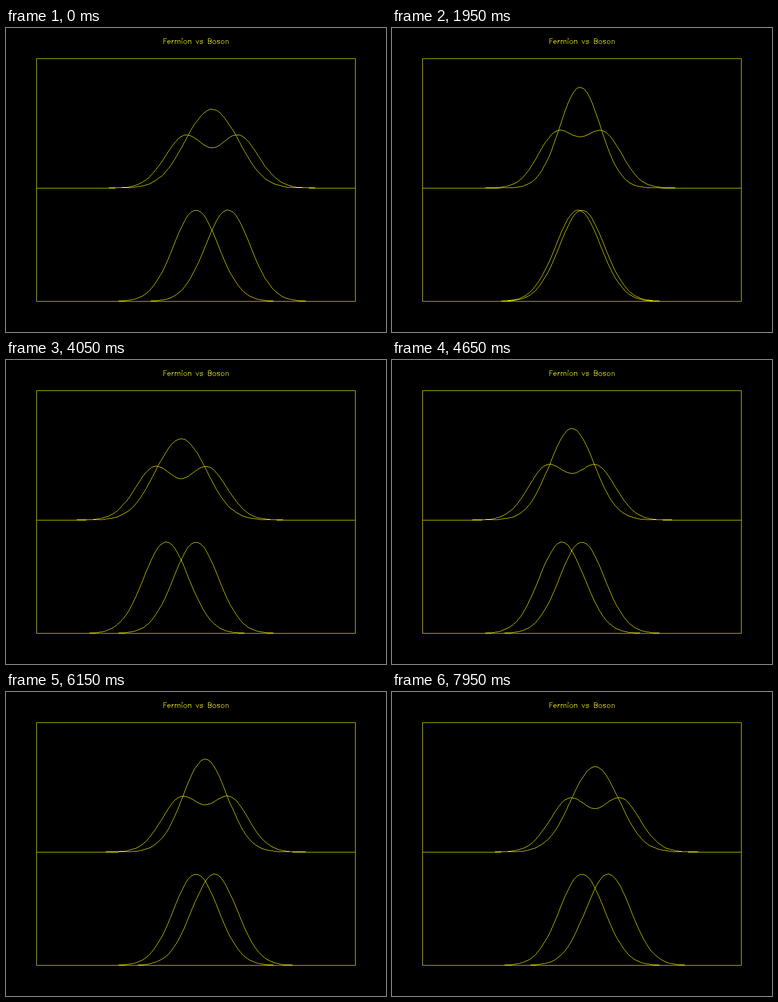
These frames come from a looping animation (837 px wide and 669 px high, 8000 ms). A matplotlib script:

```python
import numpy as np
import matplotlib.pyplot as plt
from matplotlib.animation import FuncAnimation

WIDTH, HEIGHT, DPI = 837, 669, 64
LEFT, TOP, RIGHT, BOTTOM = 67, 67, 769, 601
ZERO_Y, UNIT_Y = BOTTOM + 0.1, 712.8   # density to pixels
YELLOW = (255, 255, 0)

INTERVAL, FRAMES, HOLD = 50, 160, 3    # each pose is held for three ticks
OMEGA = 0.13                           # oscillator phase per pose, radians
SWING = 2.0                            # amplitude of the moving packet
OFFSET = 0.35                          # baseline of the upper densities
X = np.linspace(-10, 10, 100)

CAP, LOW = 21, 14                      # letter heights in font units


def arc(cx, cy, rx, ry, start, end):
    angles = np.radians(np.linspace(start, end, 17))
    return list(zip(cx + rx * np.cos(angles), cy + ry * np.sin(angles)))


def stem(height):
    return [(4, 0), (4, height)]


def arch(shift=0):
    return arc(9.5 + shift, 9, 5.5, 5, 170, 0) + [(15 + shift, 0)]


def bowl(bottom, top):
    radius = (top - bottom) / 2
    return [(4, top)] + arc(13, bottom + radius, 5, radius, 90, -90) + [(4, bottom)]


GLYPHS = {  # letter: (advance, strokes)
    " ": (16, []),
    "F": (18, [stem(CAP), [(4, CAP), (17, CAP)], [(4, 11), (12, 11)]]),
    "B": (21, [stem(CAP), bowl(11, CAP), bowl(0, 11)]),
    "e": (18, [[(3, 8)] + arc(9.2, 7, 6, 7, 8, 325)]),
    "r": (13, [stem(LOW), arc(11, 8, 7, 6, 180, 80)]),
    "m": (30, [stem(LOW), arch(), arch(11)]),
    "n": (19, [stem(LOW), arch()]),
    "i": (8, [stem(LOW), arc(4, CAP, 1, 1, 0, 360)]),
    "o": (19, [arc(9.5, 7, 6.5, 7, 0, 360)]),
    "v": (16, [[(2, LOW), (8, 0), (14, LOW)]]),
    "s": (17, [arc(8.5, 10.5, 5.5, 3.5, 10, 270) + arc(8.5, 3.5, 5.5, 3.5, 90, -170)]),
}


def draw_path(canvas, xs, ys):
    """Draw a one-pixel polyline without smoothing."""
    xs, ys = np.rint(xs).astype(int), np.rint(ys).astype(int)
    for x0, y0, x1, y1 in zip(xs, ys, xs[1:], ys[1:]):
        n = max(abs(x1 - x0), abs(y1 - y0)) + 1
        rows = np.rint(np.linspace(y0, y1, n)).astype(int)
        cols = np.rint(np.linspace(x0, x1, n)).astype(int)
        canvas[rows, cols] = YELLOW


def draw_text(canvas, text, center, baseline, scale):
    pen = center - scale * sum(GLYPHS[c][0] for c in text) / 2
    for char in text:
        advance, strokes = GLYPHS[char]
        for stroke in strokes:
            x, y = np.array(stroke).T
            draw_path(canvas, pen + scale * x, baseline - scale * y)
        pen += scale * advance


def draw_curve(canvas, density):
    xs = LEFT + (X + 10) / 20 * (RIGHT - LEFT)
    draw_path(canvas, xs, ZERO_Y - density * UNIT_Y)


def packet(center):
    return np.exp(-(X - center) ** 2 / 4) / np.sqrt(4 * np.pi)


def densities(phase):
    """Two single packets, then their symmetric and antisymmetric pairs."""
    q, p = SWING * np.cos(phase), np.sin(phase) / SWING
    still, moving = packet(0), packet(q)
    overlap = np.exp(-SWING ** 2 / 16)
    cross = overlap * np.sqrt(still * moving) * np.cos(p * (X - q / 2))
    mean = (still + moving) / 2
    boson = (mean + cross) / (1 + overlap ** 2)
    fermion = (mean - cross) / (1 - overlap ** 2)
    return still, moving, OFFSET + boson, OFFSET + fermion


background = np.zeros((HEIGHT, WIDTH, 3), dtype=np.uint8)
draw_text(background, "Fermion vs Boson", 418, 34, 0.515)
draw_path(background, [LEFT, RIGHT, RIGHT, LEFT, LEFT],
          [TOP, TOP, BOTTOM, BOTTOM, TOP])

fig = plt.figure(figsize=(WIDTH / DPI, HEIGHT / DPI), dpi=DPI, facecolor="black")
ax = fig.add_axes([0, 0, 1, 1])
ax.axis("off")
image = ax.imshow(background, interpolation="nearest", aspect="auto")


def update(frame):
    canvas = background.copy()
    for density in densities(OMEGA * (frame // HOLD)):
        draw_curve(canvas, density)
    image.set_data(canvas)
    return [image]


animation = FuncAnimation(fig, update, frames=FRAMES, interval=INTERVAL,
                          repeat=True, repeat_delay=0, blit=False)
plt.show()
```
